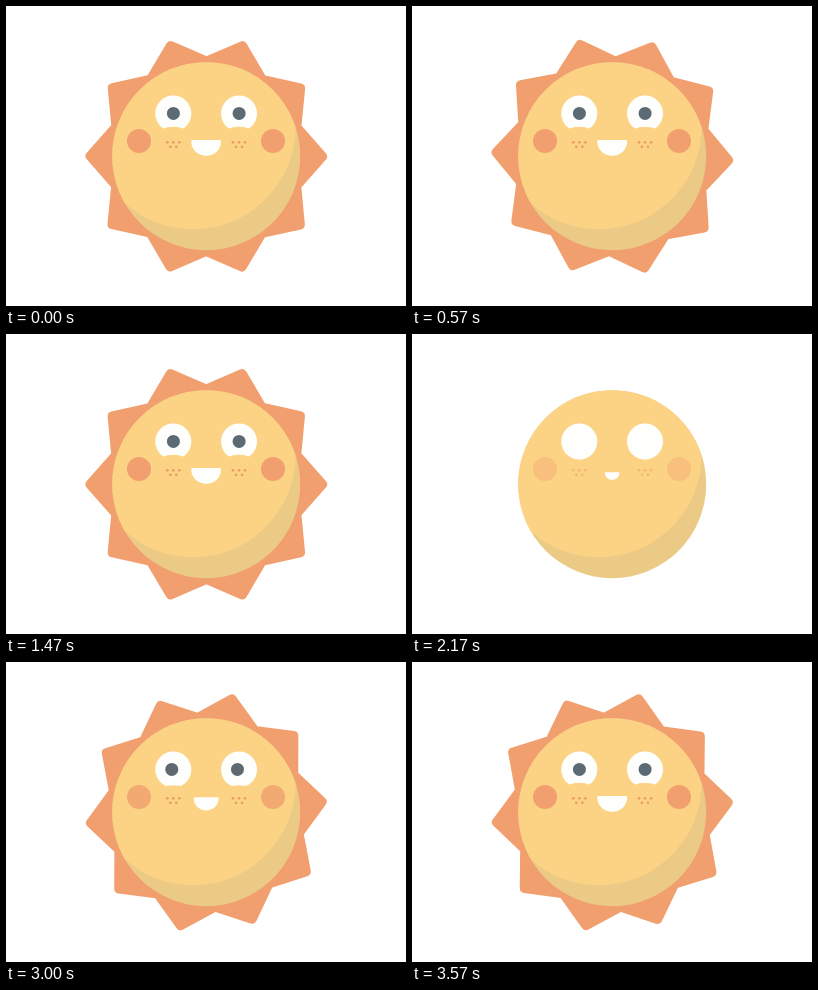
These frames come from a looping animation (400x300 px, 3.61 s). An HTML page:

```html
<!DOCTYPE html>
<html lang="en">
<head>
<meta charset="utf-8">
<title>Sun</title>
<style>
html, body { margin: 0; width: 100%; height: 100%; overflow: hidden; background: #fff; }
svg { display: block; width: 100vw; height: 100vh; }
</style>
</head>
<body>
<svg viewBox="0 0 400 300">
  <defs>
    <clipPath id="disc"><circle cx="200.2" cy="150.2" r="94"/></clipPath>
  </defs>
  <path id="rays" fill="#f19f6e" stroke="#f19f6e" stroke-width="10" stroke-linejoin="round"/>
  <g id="face">
    <circle cx="200.2" cy="150.2" r="94" fill="#ebca86"/>
    <circle cx="187" cy="120.5" r="102.7" fill="#fcd384" clip-path="url(#disc)"/>
    <g id="cheeks" fill="#f19f6e">
      <circle cx="133" cy="135" r="12"/>
      <circle cx="267" cy="135" r="12"/>
    </g>
    <g fill="#fefefd">
      <circle cx="167.3" cy="107.5" r="18"/>
      <circle cx="233" cy="107.5" r="18"/>
    </g>
    <g id="pupils">
      <circle id="pupilL" cy="107.4"/>
      <circle id="pupilR" cy="107.4"/>
    </g>
    <g id="lids" fill="#fcd384">
      <ellipse cx="167.3" cy="128.7" rx="15" ry="8"/>
      <ellipse cx="233" cy="128.7" rx="15" ry="8"/>
    </g>
    <g id="freckles" fill="#ea9c66"></g>
    <path id="mouth" fill="#fefefd" d="M-13.5-8H13.5Q15-8 15-6.3C14.6 2 8 7.8 0 7.8S-14.6 2-15-6.3Q-15-8-13.5-8Z"/>
  </g>
</svg>
<script>
const LOOP = 3610, START = 1600, CX = 200.3, CY = 150.3;
const $ = id => document.getElementById(id);
const set = (id, attrs) => { for (const k in attrs) $(id).setAttribute(k, attrs[k]); };

const ramp = (s, a, b) => Math.min(1, Math.max(0, (s - a) / (b - a)));
const easeOut = u => 1 - (1 - u) ** 3;
const easeInOut = u => u < .5 ? 4 * u ** 3 : 1 - 4 * (1 - u) ** 3;
const smooth = u => u * u * (3 - 2 * u);
const mix = (a, b, u) => a + (b - a) * u;

// One full turn: [ms, degrees, degrees per ms]
const turn = [
  [0, 0, 0], [1170, 108, .126], [1630, 169.6, .129], [2010, 216, .127],
  [2580, 289.8, .129], [3040, 344.4, .09], [3540, 360, 0]
];

function angle(s) {
  const i = turn.findIndex(k => k[0] > s);
  if (i < 0) return 360;
  const [t0, a, m] = turn[i - 1], [t1, b, n] = turn[i];
  const h = t1 - t0, u = (s - t0) / h, v = 1 - u;
  return a * v * v * (1 + 2 * u) + b * u * u * (3 - 2 * u) + h * u * v * (m * v - n * u);
}

function star(points, outer, inner) {
  let d = "";
  for (let i = 0; i < points * 2; i++) {
    const r = i % 2 ? inner : outer, a = i * Math.PI / points;
    d += (i ? "L" : "M") + (r * Math.cos(a)).toFixed(2) + " " + (r * Math.sin(a)).toFixed(2);
  }
  return d + "Z";
}

set("rays", { d: star(10, 115.8, 94.6) });
for (const x of [167.3, 233])
  for (const [dx, y] of [[-6, 136.3], [0, 136.3], [6, 136.3], [-3, 140.8], [3, 140.8]])
    $("freckles").innerHTML += `<circle cx="${x + dx}" cy="${y}" r="1.35"/>`;

function draw(t) {
  const s = (t - START + LOOP) % LOOP;

  const grow = easeOut(ramp(s, 0, 520));
  set("face", { transform: `translate(${CX} ${CY}) scale(${grow}) translate(${-CX} ${-CY})` });

  const pop = 1.05 * easeInOut(ramp(s, 880, 1170)) - .05 * smooth(ramp(s, 1180, 1400));
  set("rays", { transform: `translate(${CX} ${CY}) rotate(${angle(s)}) scale(${pop})` });

  const smile = smooth(ramp(s, 1240, 1500));
  set("cheeks", { opacity: mix(.36, 1, smile) });
  set("lids", { transform: `translate(0 ${mix(8, 0, smile)})`, opacity: smile > 0 ? 1 : 0 });
  set("mouth", { transform: `translate(200.2 142) scale(${mix(.48, 1, smile)})` });
  set("freckles", { opacity: ramp(s, 450, 690) });

  const look = -5 * smooth(ramp(s, 760, 940)) * (1 - smile);
  const r = 6.5 * easeOut(ramp(s, 590, 740));
  set("pupilL", { cx: 167.4 + look, r });
  set("pupilR", { cx: 233.1 + look, r });
  const rgb = [mix(107, 92, smile), mix(104, 106, smile), mix(103, 116, smile)].map(Math.round);
  set("pupils", { fill: `rgb(${rgb})` });
}

const begin = performance.now();
function tick() {
  draw((performance.now() - begin) % LOOP);
  requestAnimationFrame(tick);
}
draw(0);
requestAnimationFrame(tick);
</script>
</body>
</html>
```
